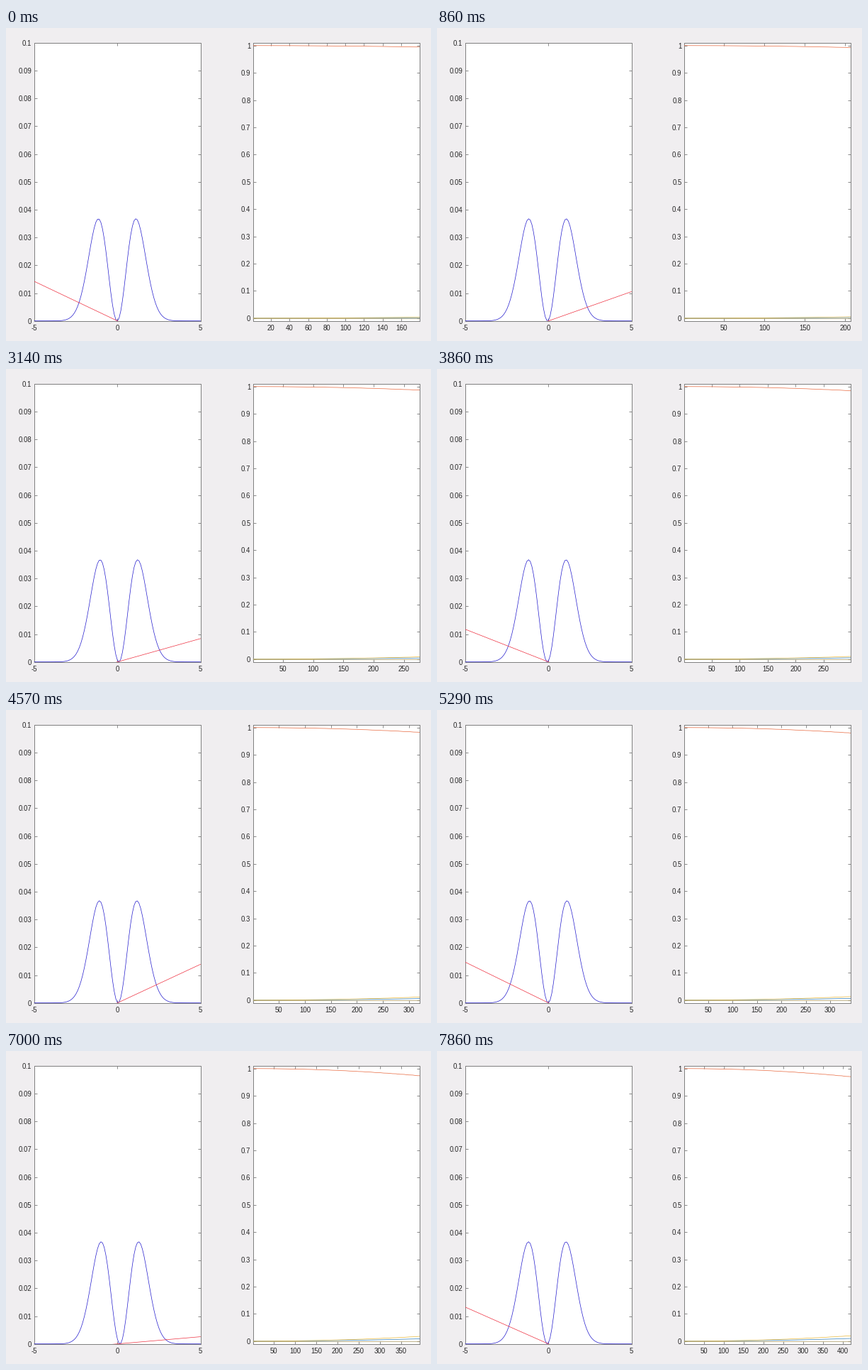
Animation, 600 px wide and 441 px high, one loop 8000 ms. Source, as a matplotlib script:

```python
import numpy as np
import matplotlib.pyplot as plt
from matplotlib.animation import FuncAnimation
from matplotlib.ticker import FormatStrFormatter

W, H, DPI = 600, 441, 100
LOOP_MS, TICK_MS = 8000, 32
POSES = 56                    # distinct pictures per loop
PT = 72 / DPI                 # points per pixel

OMEGA = np.radians(8.94)      # drive phase per time step
PHASE = np.radians(-0.9)
FIELD = 0.0147 / 5            # slope amplitude of the driving potential
SHIFT = 0.00038               # growth of the packet's swing per step
WIDTH = 1.13                  # oscillator length

plt.rcParams["font.family"] = "Liberation Sans"
fig = plt.figure(figsize=(W / DPI, H / DPI), dpi=DPI, facecolor="#f0eef0")


def make_axes(left, right, top=20.9, bottom=412.7):
    ax = fig.add_axes([left / W, 1 - bottom / H,
                       (right - left) / W, (bottom - top) / H])
    ax.tick_params(direction="in", top=True, right=True, length=3.6 * PT,
                   width=0.8 * PT, color="#707070", labelcolor="#262626",
                   labelsize=9.6 * PT)
    ax.tick_params(axis="x", pad=5.5 * PT)
    ax.tick_params(axis="y", pad=3.8 * PT)
    for spine in ax.spines.values():
        spine.set(linewidth=PT, color="#808080")
    for axis in (ax.xaxis, ax.yaxis):
        axis.set_major_formatter(FormatStrFormatter("%g"))
    return ax


def draw(ax, x, y, color, **kw):
    return ax.plot(x, y, color=color, lw=0.7 * PT, zorder=3, **kw)[0]


# Wave packet and driving potential
wave_ax = make_axes(40.2, 274.5)
wave_ax.set(xlim=(-5, 5), ylim=(0, 0.1), xticks=[-5, 0, 5],
            yticks=np.arange(11) / 100)
x = np.linspace(-5, 5, 101)
wave = draw(wave_ax, x, 0 * x, "#2018cc", clip_on=False)
potential = draw(wave_ax, x, 0 * x, "#ee3040")

# Occupation of the oscillator levels
pop_ax = make_axes(349.2, 583.7)
pop_ax.set(ylim=(-0.01, 1.01), yticks=np.arange(11) / 10)
steps = np.arange(1, 431)
leak = (0.1 / 420) ** 2 * (steps ** 2 + steps * np.sin(2 * OMEGA * steps) / OMEGA)
draw(pop_ax, steps, leak, "#2f7fbd")
draw(pop_ax, steps, 1 - 3 * leak, "#e8683e")
draw(pop_ax, steps, 2 * leak, "#ecb838")
draw(pop_ax, steps, 0 * steps, "#a8955c")


def step_at(pose):
    return np.interp(pose, [0, 6, 13, 22, 32, 43, 55],
                     [179.6, 206.4, 237.7, 275.8, 320.1, 367.7, 420])


def density(d):
    u = (x - d) / WIDTH
    return 0.2 / (np.sqrt(np.pi) * WIDTH) * u ** 2 * np.exp(-u ** 2)


def update(i):
    # a pose holds for several ticks and starts on the tick it falls into
    pose = ((i + 1) * TICK_MS - 1) * POSES // LOOP_MS
    n = step_at(pose)
    theta = OMEGA * n + PHASE
    wave.set_ydata(density(-SHIFT * n * np.sin(theta)))
    potential.set_ydata(FIELD * np.cos(theta) * x)
    gap = 20 if n < 200 else 50
    pop_ax.set_xticks(np.arange(gap, n, gap))
    pop_ax.set_xlim(1, n)
    return wave, potential


anim = FuncAnimation(fig, update, frames=LOOP_MS // TICK_MS,
                     init_func=lambda: update(0), interval=TICK_MS,
                     repeat=True, blit=False)
plt.show()
```
